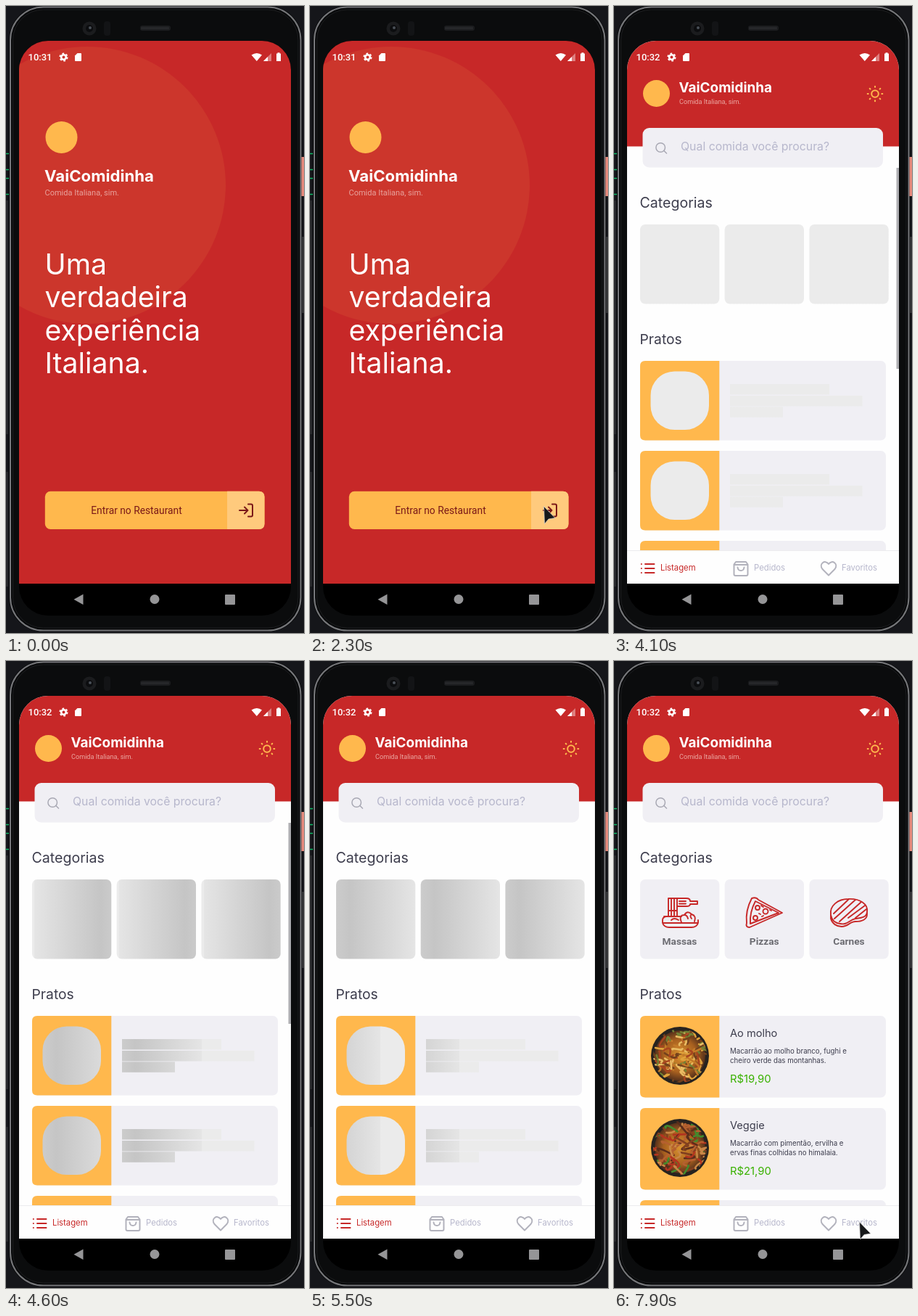
Recreate the animation shown at these times as an HTML page. Size 411x864 px, loop 8 s.

```html
<!DOCTYPE html>
<html lang="pt-BR">
<head>
<meta charset="utf-8">
<title>VaiComidinha</title>
<style>
  html, body { margin: 0; width: 100%; height: 100%; overflow: hidden; background: #15161a; }
  svg { display: block; width: 100%; height: 100%; }
  text { font-family: Inter, sans-serif; fill: #3d3d4d; }
  .roboto { font-family: Roboto, sans-serif; }
  .line { fill: none; stroke-width: 2; stroke-linecap: round; stroke-linejoin: round; }
  .food { fill: none; stroke: #c72828; stroke-width: 1.9; stroke-linecap: round; stroke-linejoin: round; }
  .tab { font-size: 11.3px; }
  .label { font: bold 13.7px Roboto, sans-serif; fill: #6c6c72; text-anchor: middle; }
  .brand { font-weight: 700; fill: #fff; }
  .muted { fill: #b7b7cc; }
</style>
</head>
<body>
<svg viewBox="0 0 411 864" preserveAspectRatio="none">
  <defs>
    <clipPath id="screen"><path d="M18 796V88A40 40 0 0 1 58 48H353A40 40 0 0 1 393 88V796Z"/></clipPath>
    <clipPath id="plate"><circle r="37"/></clipPath>
    <radialGradient id="noodles">
      <stop offset="0" stop-color="#d9932f"/><stop offset=".65" stop-color="#a8601f"/><stop offset="1" stop-color="#54301b"/>
    </radialGradient>
    <g id="gradients"></g>
  </defs>

  <g id="phone">
    <path d="M0 268H3V590H0Z M0 642H3V800H0Z" fill="#26272a"/>
    <path d="M0 203.5H4M0 225.5H4M0 237.5H4M0 259.5H4" stroke="#10b866" stroke-width="1.6"/>
    <rect x="4" y="0" width="404.500" height="862" rx="47" fill="#08090a"/>
    <rect x="6" y="1.500" width="400.500" height="859" rx="45.500" fill="none" stroke="#76777a" stroke-width="2"/>
    <rect x="9.500" y="5" width="393.500" height="852" rx="42" fill="#0b0c0d" stroke="#1d1e20"/>
    <rect x="407.500" y="208" width="3.500" height="54" fill="#e58a7c"/>
    <rect x="407.500" y="318" width="3.500" height="105" fill="#333436"/>
    <rect x="18" y="48" width="375" height="792" rx="40" fill="#000"/>
    <circle cx="115" cy="31" r="9.500" fill="#1b1c1e"/><circle cx="115" cy="31" r="5" fill="#0c0d0f"/>
    <circle cx="116" cy="30" r="2" fill="#4a5058"/>
    <rect x="135" y="21" width="9" height="20" rx="4" fill="#131416"/>
    <rect x="185" y="27" width="42" height="7" rx="3" fill="#1c1d1f"/>
    <path d="M187 30.500H225" stroke="#303134" stroke-width="3" stroke-dasharray="1 1"/>
    <g fill="#959597"><path d="M106.500 810.500V825L93.500 817.700Z"/><circle cx="205" cy="817.500" r="6.500"/><rect x="302" y="811" width="14" height="14" rx="1"/></g>
  </g>

  <g clip-path="url(#screen)">
    <g id="splash">
      <rect x="18" y="48" width="375" height="748" fill="#c72828"/>
      <circle cx="112" cy="247" r="191" fill="#cc362c"/>
      <circle cx="76.500" cy="181" r="22" fill="#ffb84d"/>
      <text class="brand" x="53" y="242" font-size="22.200">VaiComidinha</text>
      <text class="roboto" x="53.500" y="261" font-size="11" style="fill:#e8a39d">Comida Italiana, sim.</text>
      <g id="headline"></g>
      <rect x="53.800" y="668.700" width="302.700" height="52.300" rx="7.500" fill="#ffb84d"/>
      <path d="M305 668.700H349Q356.500 668.700 356.500 676.200V713.500Q356.500 721 349 721H305Z" fill="#ffca7d"/>
      <text class="roboto" x="180" y="700" font-size="13.800" text-anchor="middle" style="fill:#7a1818">Entrar no Restaurant</text>
      <path class="line" stroke="#7a1818" d="M334 686.500H338Q340 686.500 340 688.500V701.500Q340 703.500 338 703.500H334M322 695H333.500M329 690.500L333.500 695L329 699.500"/>
    </g>

    <g id="home">
      <rect x="18" y="48" width="375" height="748" fill="#fefefe"/>
      <g id="categories">
        <g id="categorySkeleton"></g>
        <g id="categoryTiles">
          <g id="tiles" fill="#f0eff4"></g>
          <g class="food">
            <path d="M75 327V351M79 327V351M83 327V351M87 327V351M75 327H87M75 344H87M87 327H100Q105 327 105 331H115V335H105Q105 338 100 338H87M90 331H99M90 334.500H99M69 352H93M67 357V361H116V357M67 361Q69 367 76 367H107Q114 367 116 361M72 352Q67 353 67 357M79 357Q83 353 89 357"/>
            <path d="M93 360Q89 350 97 350Q101 343 107 349Q114 351 111 359M97 350Q101 350 102 355M107 349Q104 351 107 355"/>
            <path d="M190 327Q196 325 199 329L232 347L187 367Q181 367 183 361Q181 344 190 327ZM195 331Q187 346 188 362L227 347Z"/>
            <circle cx="198" cy="340" r="3"/><circle cx="209" cy="345" r="3.500"/><circle cx="195" cy="354" r="3"/><path d="M203 337L206 339M200 348L202 349M204 352L206 351M215 343L217 344"/>
            <path d="M299 350C297 337 309 328 323 328C339 327 351 335 349 346C348 354 340 354 333 355C324 357 322 364 312 362C304 361 300 356 299 350ZM299 350V355C301 362 307 366 314 366C323 366 325 359 333 359C342 359 349 356 349 349V345"/>
            <path d="M303 348L323 329M304 355L333 329M311 359L341 332M323 354L346 337M333 354L348 342"/>
          </g>
          <g id="tileLabels"></g>
        </g>
      </g>
      <g id="dishSkeleton"></g>
      <g id="dishes"></g>
      <rect id="scrollbar" x="389.500" y="223" width="4" height="277" fill="#aeaeb2"/>
      <rect x="18" y="48" width="375" height="145.500" fill="#c72828"/>
      <circle cx="58.500" cy="120.500" r="18.500" fill="#ffb84d"/>
      <text class="brand" x="89.500" y="118.500" font-size="18.900">VaiComidinha</text>
      <text class="roboto" x="90" y="135" font-size="9.150" style="fill:#eba9a3">Comida Italiana, sim.</text>
      <g id="sun" class="line" stroke="#ffb84d"><circle cx="360" cy="121" r="4.800"/></g>
      <rect x="39.500" y="168" width="331.500" height="54.500" rx="9" fill="#f0eff4"/>
      <g class="line" stroke="#a9a9b4" style="stroke-width:1.5"><circle cx="64.200" cy="195" r="6.300"/><path d="M69 199.500L72.500 203"/></g>
      <text class="muted" x="92" y="199" font-size="15.850">Qual comida você procura?</text>
      <text x="35.500" y="278" font-size="19.600">Categorias</text>
      <text id="dishTitle" x="35.500" font-size="19.300">Pratos</text>
      <rect x="18" y="750" width="375" height="46" fill="#fefefe"/>
      <path d="M18 750.500H393" stroke="#ececee"/>
      <path class="line" stroke="#c72828" d="M43 769H55.500M43 775H55.500M43 781H55.500M37.800 769h.1M37.800 775h.1M37.800 781h.1"/>
      <g class="line" stroke="#b2b2bc">
        <path d="M168 766H182L184.500 769.500V783Q184.500 785 182.500 785H167.500Q165.500 785 165.500 783V769.500ZM165.500 770H184.500M170.500 773.500Q171 778 175 778T179.500 773.500"/>
        <path d="M296 784.500L287.500 776C282 769 291 762 296 769C301 762 310 769 304.500 776Z"/>
      </g>
      <text class="tab" x="64" y="778" style="fill:#c72828">Listagem</text>
      <text class="tab muted" x="193" y="778">Pedidos</text>
      <text class="tab muted" x="314" y="778">Favoritos</text>
    </g>

    <g id="status" fill="#fff">
      <text id="clock" class="roboto" x="30.500" y="75" font-size="13" font-weight="500" style="fill:#fff"></text>
      <circle cx="79.500" cy="70.500" r="3.300" fill="none" stroke="#fff" stroke-width="2.600"/>
      <circle cx="79.500" cy="70.500" r="5.200" fill="none" stroke="#fff" stroke-width="1.800" stroke-dasharray="2.723"/>
      <path d="M98.500 65H103Q104 65 104 66V75Q104 76 103 76H96Q95 76 95 75V68.500Z"/>
      <path d="M338.500 67.500Q346 62.500 353 67.500L345.800 76Z"/>
      <path d="M366 65V76H355Z" opacity=".4"/><path d="M361 70V76H355Z"/>
      <path d="M374.500 65.500V64.200H377.500V65.500H379V76H373V65.500Z"/>
    </g>
  </g>

  <path id="cursor" d="M0 0L1 24L6.500 17.500L15.500 16Z" fill="#17181a" stroke="#d8d8d8" stroke-width=".7"/>
</svg>

<script>
const $ = id => document.getElementById(id);
const fill = (id, items, make) => $(id).innerHTML += items.map(make).join('');
const show = (id, on) => $(id).setAttribute('display', on ? 'inline' : 'none');

const LOOP = 8000, STEP = 100;
const BAND = 182;                       // shimmer band width
const TILE_X = [36, 152.7, 269.4];
const GRADIENT_X = [...TILE_X, 51, 160];

fill('headline', ['Uma', 'verdadeira', 'experiência', 'Italiana.'], (line, i) =>
  `<text x="53.5" y="${369.5 + i * 45.5}" font-size="39.2" style="fill:#fff">${line}</text>`);

fill('sun', [...Array(8).keys()], i =>
  `<path d="M360 111.700V110.700" transform="rotate(${i * 45} 360 121)"/>`);

fill('gradients', GRADIENT_X, (x, i) => `
  <linearGradient id="shine${i}" gradientUnits="userSpaceOnUse">
    <stop offset="0" stop-color="#ebebeb"/><stop offset="0" stop-color="#e5e5e5"/>
    <stop offset=".5" stop-color="#c5c5c5"/>
    <stop offset="1" stop-color="#e5e5e5"/><stop offset="1" stop-color="#ebebeb"/>
  </linearGradient>`);

const tile = (x, paint) => `<rect x="${x}" y="301" width="109.300" height="109.500" rx="7" ${paint}/>`;
fill('categorySkeleton', TILE_X, (x, i) => tile(x, `fill="url(#shine${i})"`));
fill('tiles', TILE_X, x => tile(x, ''));
fill('tileLabels', ['Massas', 'Pizzas', 'Carnes'], (name, i) =>
  `<text class="label" x="${TILE_X[i] + 54.5}" y="391">${name}</text>`);

const card = (y, height) => `
  <rect x="36" y="${y}" width="339" height="${height}" rx="7" fill="#f0eff4"/>
  <path d="M145.300 ${y}H43q-7 0-7 7v${height - 14}q0 7 7 7H145.300Z" fill="#ffb84d"/>`;

const bar = (y, width) => `<rect x="160" y="${y}" width="${width}" height="14.500" fill="url(#shine4)"/>`;
fill('dishSkeleton', [489, 613, 737], y => card(y, 109.5) +
  `<rect x="50.500" y="${y + 14.5}" width="80.500" height="80.500" rx="33" fill="url(#shine3)"/>` +
  bar(y + 32, 137) + bar(y + 48, 182.5) + bar(y + 63.3, 73));

function seeded(seed) {
  return () => (seed = seed * 16807 % 2147483647) / 2147483647;
}

function plate(y, seed, tones) {
  const random = seeded(seed), spot = () => (random() * 68 - 34).toFixed(1);
  const strands = Array.from({length: 84}, (_, i) =>
    `<path d="M${spot()} ${spot()}q${spot() / 2} ${spot() / 3} ${spot() / 2} ${spot() / 2}" stroke="${tones[i % tones.length]}"/>`);
  return `<g transform="translate(91 ${y})">
    <circle r="40" fill="#28231f"/><circle r="35" fill="url(#noodles)"/>
    <g clip-path="url(#plate)" fill="none" stroke-width="2.600" stroke-linecap="round">${strands.join('')}</g></g>`;
}

const dishes = [
  {name: 'Ao molho', text: ['Macarrão ao molho branco, fughi e', 'cheiro verde das montanhas.'], price: 'R$19,90',
   seed: 71, tones: ['#e0a23b', '#c47a28', '#74411c', '#e9bc63', '#a8451f', '#718033']},
  {name: 'Veggie', text: ['Macarrão com pimentão, ervilha e', 'ervas finas colhidas no himalaia.'], price: 'R$21,90',
   seed: 293, tones: ['#b5602f', '#82401f', '#c98746', '#5b2d1b', '#b3341f', '#448a2c']},
];
fill('dishes', dishes, (dish, i) => {
  const y = 489 + i * 127;
  return card(y, 112.5) + `
    <text x="160" y="${y + 29}" font-size="14.600">${dish.name}</text>
    <text x="160" y="${y + 52}" font-size="9.700">${dish.text[0]}</text>
    <text x="160" y="${y + 64.5}" font-size="9.700">${dish.text[1]}</text>
    <text x="160" y="${y + 92}" font-size="14.800" style="fill:#39b100">${dish.price}</text>
    <g id="photo${i}">${plate(y + 55, dish.seed, dish.tones)}</g>`;
});
$('dishes').innerHTML += card(743, 112.5);

const clamp = x => Math.min(1, Math.max(0, x));
const smooth = x => x * x * (3 - 2 * x);
const bezier = (a, b, c, p) => a * (1 - p) ** 2 + 2 * b * p * (1 - p) + c * p * p;

function shimmer(index, time, start) {
  const elapsed = Math.max(0, time - start) % 1020;
  const x = GRADIENT_X[index] + BAND * (2 * smooth(clamp(elapsed / 850)) - 1);
  $('shine' + index).setAttribute('x1', x);
  $('shine' + index).setAttribute('x2', x + BAND);
}

function moveCursor(t) {
  const entering = t >= 1500 && t < 3400, leaving = t >= 7200;
  show('cursor', entering || leaving);
  const p = smooth(clamp(entering ? (t - 1500) / 800 : (t - 7200) / 700));
  const x = entering ? 116 + 206.5 * p : bezier(0, 190, 338.5, p);
  const y = entering ? 375 + 314.5 * p : bezier(524, 840, 773, p);
  $('cursor').setAttribute('transform', `translate(${x} ${y})`);
}

function draw(t) {
  const home = t >= 3400, listed = t >= 4100, loaded = t >= 6400;
  show('splash', !home);
  show('home', home);
  $('clock').textContent = home ? '10:32' : '10:31';
  $('dishTitle').setAttribute('y', listed ? 466 : 356.5);
  show('categories', listed);
  show('categorySkeleton', t < 6100);
  show('categoryTiles', t >= 6100);
  show('dishSkeleton', listed && !loaded);
  show('dishes', loaded);
  show('photo0', t >= 6500);
  show('photo1', t >= 6600);
  show('scrollbar', listed && t < 5000);
  $('scrollbar').setAttribute('opacity', clamp((5000 - t) / 300));
  GRADIENT_X.forEach((_, i) => shimmer(i, t, i < 3 ? 4170 : 4290));
  moveCursor(t);
}

const origin = performance.now();
function tick() {
  const t = (performance.now() - origin) % LOOP;
  draw(Math.floor(t / STEP) * STEP);
  requestAnimationFrame(tick);
}
tick();
</script>
</body>
</html>
```
